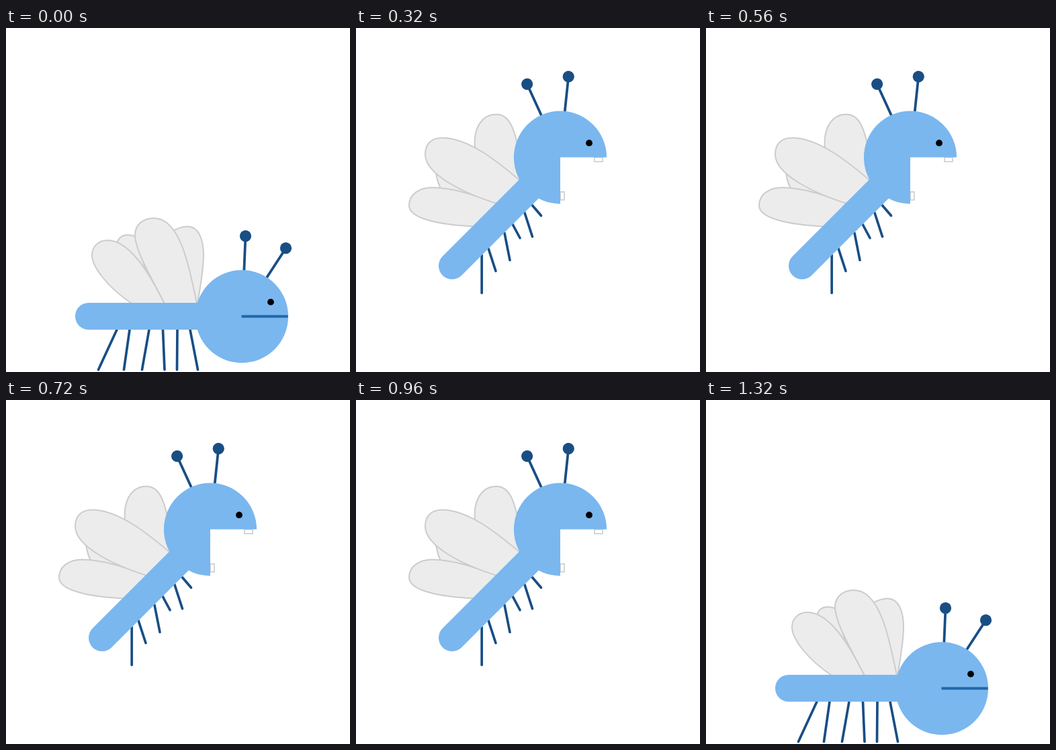
Write an HTML page with a canvas that moves like this. It is 512 px wide and 512 px high and loops after 2 s.

```html
<!DOCTYPE html>
<html lang="en">
<head>
<meta charset="utf-8">
<title>Flying bug</title>
<style>
  html, body { margin: 0; width: 100%; height: 100%; overflow: hidden; background: #fff; }
  canvas { display: block; width: 512px; height: 512px; }
</style>
</head>
<body>
<canvas id="stage" width="512" height="512"></canvas>
<script>
const ctx = document.getElementById('stage').getContext('2d');
const BLUE = '#7ab7ef', NAVY = '#194e84', MOUTH = '#2267ab', WING = '#ececec', EDGE = '#ccc';
const STEP = 40, LOOP = 2000, RADIUS = 69.1;
const rad = degrees => degrees * Math.PI / 180;
const paths = list => list.map(d => new Path2D(d));

const groundLegs = [
  [165, 449, 137.5, 508.5], [184, 449, 175.5, 508.5], [213, 449, 202.5, 508.5],
  [233.5, 449, 236, 508.5], [255, 449, 254.5, 508.5], [274, 449, 285.5, 508.5]
];
const flyLegs = [
  [187.2, 338, 187.2, 394.3], [197, 328, 208, 361.7], [221, 305, 229, 345.5],
  [233, 292, 244, 312.5], [251, 275, 262.5, 310.5], [262, 263.5, 275.5, 279.3]
];

const rest = {
  head: [351, 429.3], tail: [123, 429], neck: [310, 429], legs: groundLegs, tilt: 0, edge: 2,
  back: paths([
    'M165 320C168 311 175 308 181 308C186 308 190 309 194 311L208 362Z',
    'M245 304C253 299 261 295.5 270 295.5C287 295.5 294 315 294 338C294 362 289 385 285 410'
  ]),
  front: paths([
    'M187 410C150 385 128 355 128 338C128 325 138 316 151 316C183 316 212 362 236 410',
    'M236 410C215 370 192 330 192 308C192 293 204 283 220 283C258 283 272 350 284 410'
  ])
};
const crouch = { ...rest, tilt: 8 };
const wingsUp = {
  head: [304, 192.6], tail: [143, 354], neck: [262, 235], legs: flyLegs, open: true, edge: 2,
  back: paths([
    'M119 215C121 230 124 236 128 242L175 250L160 235Z',
    'M177 180C174 145 190 128.5 209 128.5C228 128.5 235 150 240 172L250 235L195 210Z'
  ]),
  front: paths([
    'M176 295.5C125 293 79 284 79 264C79 247 95 237.5 113 237.5C145 237.5 180 250 212 262',
    'M212 262C160 246 103 218 103 188C103 172 113 163.5 128 163.5C168 163.5 212 200 243 226'
  ])
};
const wingsDown = {
  ...wingsUp, head: [304, 188.6], tail: [143, 350], neck: [262, 231], edge: 1.3, wingsOnTop: true,
  legs: flyLegs.map(([x1, y1, x2, y2]) => [x1, y1 - 4, x2, y2 - 4]),
  back: paths([
    'M203 316C201 325 202 328 206 332C215 346 225 354 237 354C250 354 258 346 258 332L240 300Z',
    'M304 256C308 264 308 270 307.5 274C306 290 298 302.5 284 302.5C278 302.5 275 302 270 301L262 262V235'
  ]),
  front: paths([
    'M162 302C155 325 152 350 152 367C152 379 157 384 164 384C184 384 203 345 204.5 305C204.5 290 203 275 201.5 262',
    'M202 262C203 285 204 302 209 317C213 333 221 343 234 343C258 343 272 325 272 300C272 275 258 243 242 221'
  ])
};

function line(x1, y1, x2, y2, color, width, cap = 'round') {
  ctx.strokeStyle = color;
  ctx.lineWidth = width;
  ctx.lineCap = cap;
  ctx.beginPath();
  ctx.moveTo(x1, y1);
  ctx.lineTo(x2, y2);
  ctx.stroke();
}

function disc(x, y, r, color) {
  ctx.fillStyle = color;
  ctx.beginPath();
  ctx.arc(x, y, r, 0, 2 * Math.PI);
  ctx.fill();
}

function drawWings(wings, edge) {
  ctx.fillStyle = WING;
  ctx.strokeStyle = EDGE;
  ctx.lineWidth = edge;
  ctx.lineCap = 'butt';
  for (const wing of wings) {
    ctx.fill(wing);
    ctx.stroke(wing);
  }
}

function tooth(x, y, w, h) {
  ctx.strokeStyle = EDGE;
  ctx.lineWidth = 1.6;
  ctx.strokeRect(x, y, w, h);
}

function tilted(pose, draw) {
  ctx.save();
  ctx.translate(213, 429);
  ctx.rotate(rad(pose.tilt || 0));
  ctx.translate(-213, -429);
  draw();
  ctx.restore();
}

function drawHead({ head, open }) {
  ctx.save();
  ctx.translate(...head);
  ctx.save();
  if (open) ctx.rotate(rad(-27));
  for (const [x1, y1, x2, y2] of [[3, -60, 5.5, -120], [32, -50, 65.5, -102]]) {
    line(x1, y1, x2, y2 + 0.4, NAVY, 3.8);
    disc(x2, y2 + 0.4, 8.6, NAVY);
  }
  ctx.restore();
  if (open) {
    tooth(51, 0, 12, 6.3);
    tooth(0, 51.3, 6, 12);
  }
  ctx.fillStyle = BLUE;
  ctx.beginPath();
  ctx.moveTo(0, 0);
  ctx.arc(0, 0, RADIUS, open ? Math.PI / 2 : 0, 2 * Math.PI);
  ctx.fill();
  if (!open) line(-0.5, 0, RADIUS - 0.5, 0, MOUTH, 4, 'butt');
  disc(43, -21.4, 4.9, '#000');
  ctx.restore();
}

function drawBug(pose) {
  const frontWings = () => drawWings(pose.front, pose.edge);
  ctx.fillStyle = '#fff';
  ctx.fillRect(0, 0, 512, 512);
  tilted(pose, () => {
    drawWings(pose.back, pose.edge);
    if (!pose.wingsOnTop) frontWings();
  });
  for (const leg of pose.legs) line(...leg, NAVY, 3.7);
  tilted(pose, () => {
    line(...pose.tail, ...pose.neck, BLUE, 40);
    drawHead(pose);
    if (pose.wingsOnTop) frontWings();
  });
}

function poseAt(time) {
  const step = Math.floor(time % LOOP / STEP);
  if (step < 1 || step > 32) return rest;
  if (step < 3 || step > 30) return crouch;
  return step % 2 ? wingsDown : wingsUp;
}

function tick() {
  drawBug(poseAt(performance.now()));
  requestAnimationFrame(tick);
}
tick();
</script>
</body>
</html>
```
